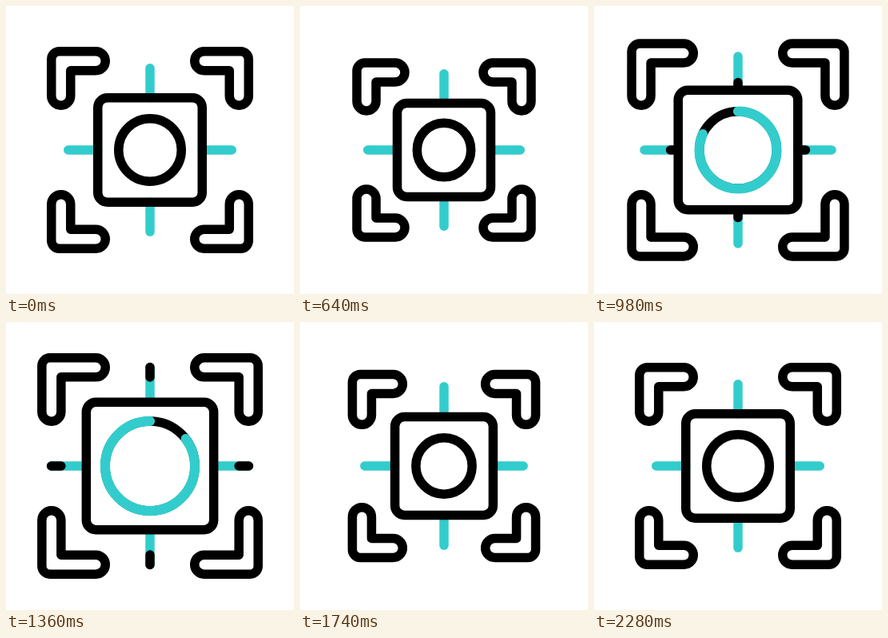
Animation, 360 px wide and 360 px high, one loop 2440 ms. Source, as an HTML page:

```html
<!DOCTYPE html>
<html lang="en">
<head>
<meta charset="utf-8">
<title>Focus frame</title>
<style>
  html, body { margin: 0; width: 100%; height: 100%; overflow: hidden; background: #fff; }
  svg { display: block; width: 100%; height: 100%; }
  .ink, .tint { fill: none; stroke-width: 11.5; stroke-linecap: round; stroke-linejoin: round; }
  .ink { stroke: #000; }
  .tint { stroke: #33cccc; }
  circle.tint { stroke-width: 12.2; }
</style>
</head>
<body>
<svg id="stage" viewBox="0 0 360 360"></svg>
<script>
const LOOP = 2440, STEP = 20, BEGIN = 200, END = 2280;
const MID = 180, HALF = 5.75, BAND = 24, REST_EDGE = 51;

// Progress from 0 to 1 between two times, eased at both ends.
function span(t, from, to) {
  const p = Math.min(1, Math.max(0, (t - from) / (to - from)));
  return p * p * (3 - 2 * p);
}

// Pull in, swing out, hold, pull in, swing out less, settle; lag delays the middle beats.
function swing(t, rest, near, far, lag = 0) {
  const over = near + (far - near) * 0.79;
  const s = t - lag;
  return rest
    + (near - rest) * span(t, BEGIN, 600 + lag)
    + (far - near) * span(s, 600, 1120)
    + (near - far) * span(s, 1300, 1600)
    + (over - near) * span(s, 1600, 2020)
    + (rest - over) * span(t, 2020 + lag, END);
}

const stage = document.getElementById("stage");

function set(node, attrs) {
  for (const name in attrs) node.setAttribute(name, attrs[name]);
}

function add(tag, attrs) {
  const node = document.createElementNS("http://www.w3.org/2000/svg", tag);
  set(node, attrs);
  stage.append(node);
  return node;
}

const turns = [0, 90, 180, 270].map(a => `rotate(${a} ${MID} ${MID})`);
const fourPaths = kind => turns.map(transform => add("path", { class: kind, transform }));

const rays = fourPaths("tint");
const darkRays = fourPaths("ink");
const square = add("rect", { class: "ink", rx: 12 });
const lens = add("circle", { class: "ink", cx: MID, cy: MID });
const ring = add("circle", { class: "tint", cx: MID, cy: MID, pathLength: 1, transform: turns[3] });
const corners = fourPaths("ink");

function cornerPath(edge) {
  const tip = 130 + 0.47 * Math.max(0, edge - REST_EDGE);
  const a = edge + HALF, b = a + BAND, r = BAND / 2, end = tip - HALF - r, bend = a + 10;
  return `M${b} ${b}H${end}A${r} ${r} 0 0 0 ${end} ${a}H${bend}` +
    `A10 10 0 0 0 ${a} ${bend}V${end}A${r} ${r} 0 0 0 ${b} ${end}Z`;
}

function draw(t) {
  const d = cornerPath(swing(t, REST_EDGE, 65.8, 36));
  corners.forEach(node => set(node, { d }));

  const half = swing(t, 71, 64.2, 86, 30) - HALF;
  const far = swing(t, 108, 101, 130, 30) - HALF;
  set(square, { x: MID - half, y: MID - half, width: half * 2, height: half * 2 });

  const ray = (from, to) => {
    const y = p => MID - half - (far - half) * p;
    return to > from ? `M${MID} ${y(from)}V${y(to)}` : "";
  };
  const light = ray(0, 1), dark = ray(span(t, 1230, 1430), span(t, 890, 1180));
  rays.forEach(node => set(node, { d: light }));
  darkRays.forEach(node => set(node, { d: dark }));

  const r = swing(t, 45, 39.4, 61.8, 65) - HALF;
  const from = span(t, 1290, 1580), arc = span(t, 660, 1100) - from;
  set(lens, { r });
  set(ring, {
    r,
    "stroke-dasharray": `${arc} 2`,
    "stroke-dashoffset": -from,
    visibility: arc > 0 ? "visible" : "hidden"
  });
}

const start = performance.now();
function tick() {
  const t = (performance.now() - start) % LOOP;
  draw(Math.floor(t / STEP) * STEP);
  requestAnimationFrame(tick);
}
tick();
</script>
</body>
</html>
```
